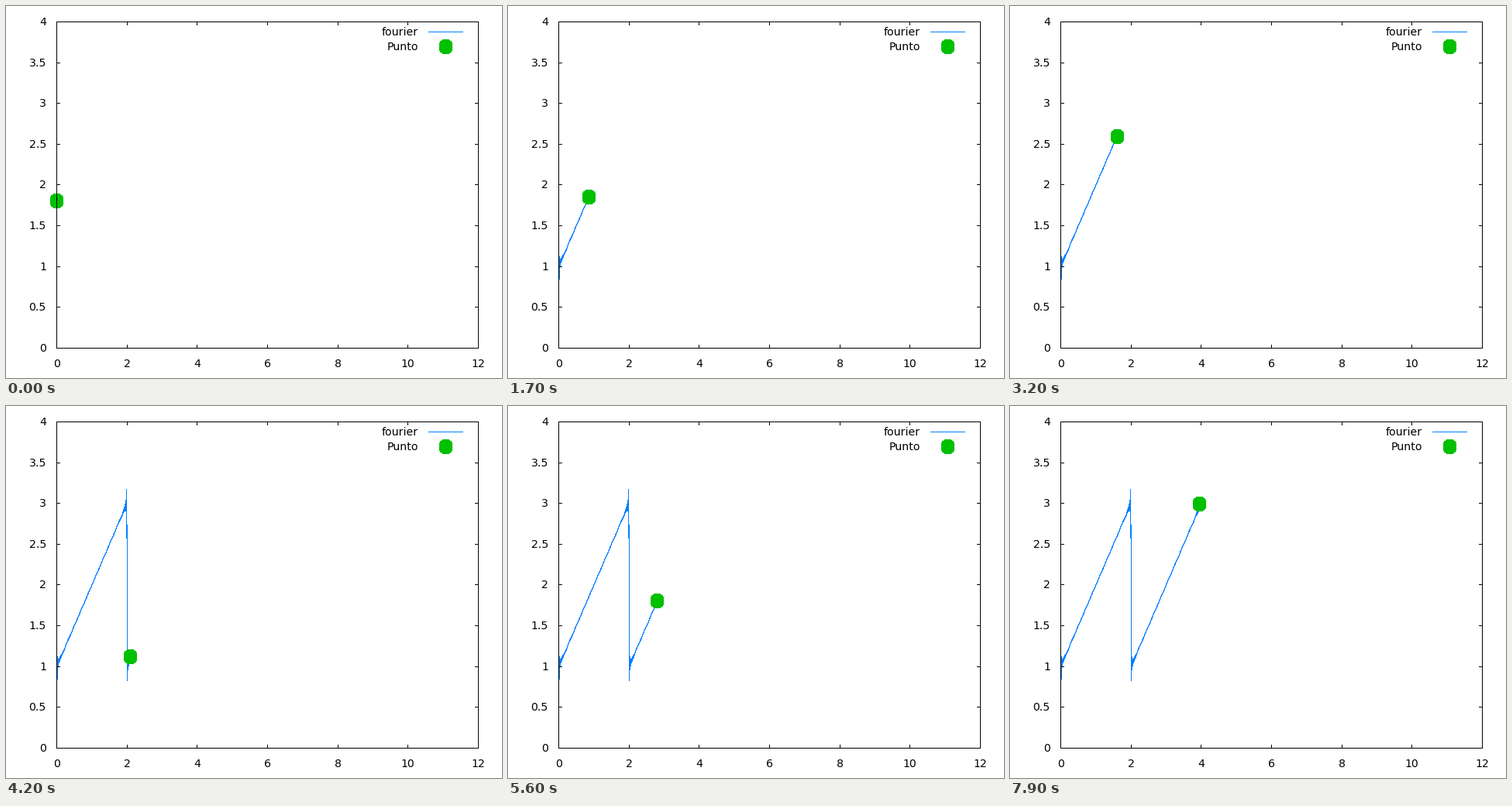
Write a matplotlib script that moves like this. It is 640 by 480 pixels and loops after 8 s.

```python
import numpy as np
import matplotlib
import matplotlib.pyplot as plt
from matplotlib.animation import FuncAnimation

matplotlib.rcParams["path.simplify"] = False

W, H, DPI = 640, 480, 80
PT = 72 / DPI                      # one pixel in points
LEFT, RIGHT, TOP, BOTTOM = 65, 609, 20, 441
X_MAX, Y_MAX = 12, 4
BLUE, GREEN = "#0080ff", "#00c000"
FRAMES, PER_FRAME, DX = 80, 50, 0.001
TERMS = 100


def to_px(x, y):
    """Data coordinates to whole pixels."""
    px = LEFT + np.floor(np.asarray(x) * (RIGHT - LEFT) / X_MAX + 0.5)
    py = BOTTOM - np.floor(np.asarray(y) * (BOTTOM - TOP) / Y_MAX + 0.5)
    return px, py


def sawtooth(x):
    n = np.arange(1, TERMS + 1)[:, None]
    return 2 - 2 / np.pi * (np.sin(n * np.pi * x) / n).sum(axis=0)


fig = plt.figure(figsize=(W / DPI, H / DPI), dpi=DPI, facecolor="white")
ax = fig.add_axes([0, 0, 1, 1])
ax.set_xlim(0, W)
ax.set_ylim(H, 0)
ax.axis("off")


def stroke(xs, ys, color="black", z=5):
    line, = ax.plot(np.asarray(xs) + 0.5, np.asarray(ys) + 0.5, color=color,
                    lw=PT, antialiased=False, zorder=z,
                    solid_capstyle="projecting", solid_joinstyle="miter")
    line.set_snap(False)
    return line


def label(x, y, text, align):
    ax.text(x, y, text, ha=align, va="baseline", color="black",
            family="DejaVu Sans", size=14.2 * PT, zorder=6)


# Disc with slightly flattened sides
angle = np.linspace(0, 2 * np.pi, 60, endpoint=False)
DISC = np.column_stack([np.clip(9.3 * np.cos(angle), -8.5, 8.5),
                        9.3 * np.sin(angle)])


def disc_at(px, py):
    return DISC + [px + 0.5, py + 0.5]


def disc(px, py):
    patch = plt.Polygon(disc_at(px, py), fc=GREEN, lw=0,
                        antialiased=False, zorder=4)
    patch.set_snap(False)
    return ax.add_patch(patch)


# Frame, ticks and tick labels
stroke([LEFT, RIGHT, RIGHT, LEFT, LEFT], [TOP, TOP, BOTTOM, BOTTOM, TOP])
TICK = 4
for v in range(0, X_MAX + 1, 2):
    px, _ = to_px(v, 0)
    stroke([px, px], [BOTTOM, BOTTOM - TICK])
    stroke([px, px], [TOP, TOP + TICK])
    label(px + 0.5, 465.5, str(v), "center")
for v in np.arange(0, Y_MAX + 0.1, 0.5):
    _, py = to_px(0, v)
    stroke([LEFT, LEFT + TICK], [py, py])
    stroke([RIGHT, RIGHT - TICK], [py, py])
    label(52, py + 5, f"{v:g}", "right")

# Legend
label(532, 38, "fourier", "right")
label(532, 57, "Punto", "right")
stroke([545, 589], [33, 33], BLUE, 3)
disc(567, 52)

# Curve and moving point
t = DX * np.arange(1, (FRAMES - 1) * PER_FRAME + 2)
cx, cy = to_px(t, sawtooth(t))
curve = stroke([], [], BLUE, 3)
point = disc(cx[0], cy[0])


def update(i):
    last = i * PER_FRAME
    curve.set_data(cx[:last + 1] + 0.5, cy[:last + 1] + 0.5)
    point.set_xy(disc_at(cx[last], cy[last]))
    return curve, point


anim = FuncAnimation(fig, update, frames=FRAMES, interval=100,
                     repeat=True, repeat_delay=0, blit=False)
plt.show()
```
